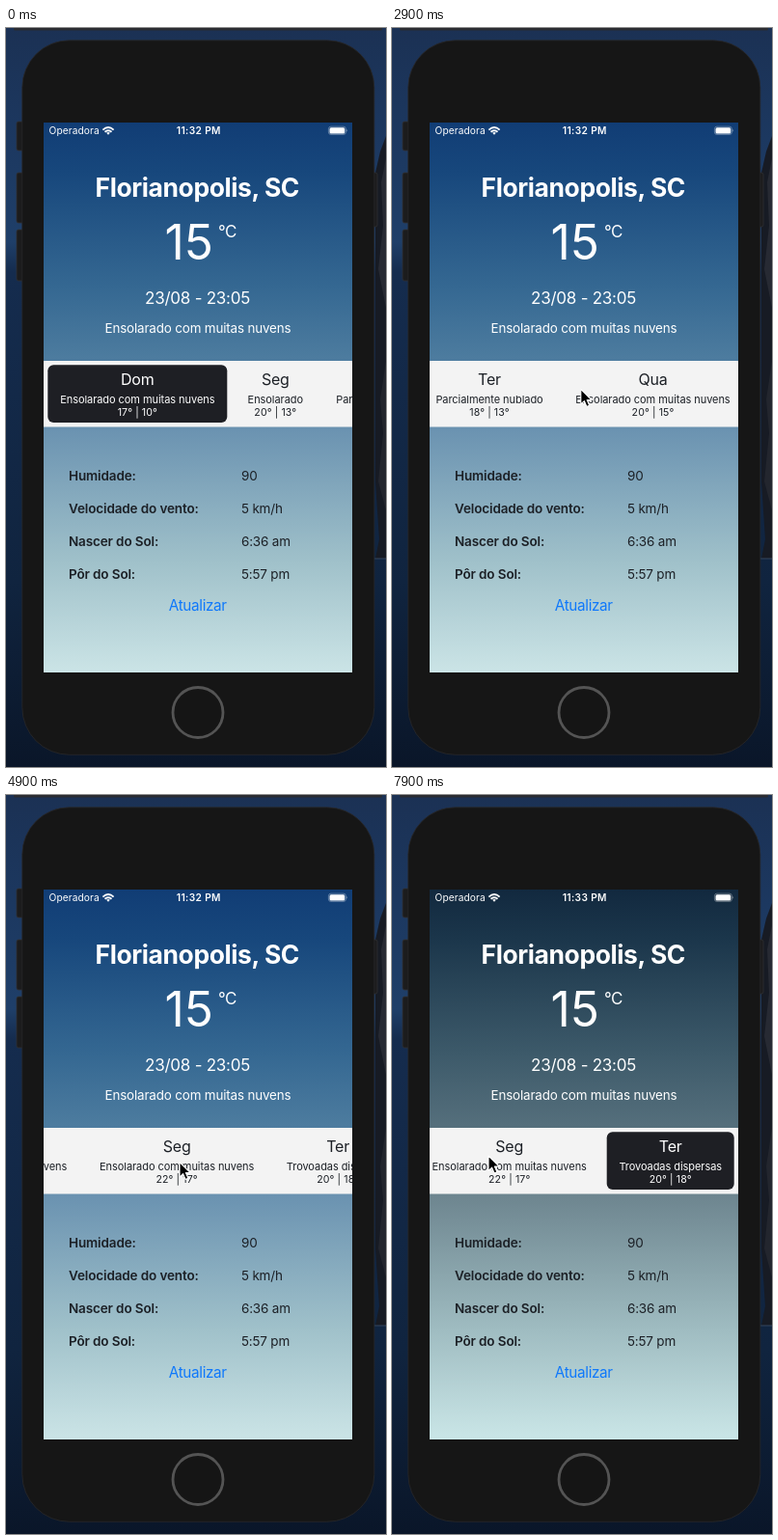
Recreate the animation shown at these times as an HTML page. Size 394 by 766 pixels, loop 8000 ms.

```html
<!DOCTYPE html>
<html lang="pt">
<head>
<meta charset="utf-8">
<title>Previsão do tempo</title>
<style>
html, body { margin: 0; width: 100%; height: 100%; overflow: hidden; background: #0d1c34; }
svg { display: block; width: 394px; height: 766px; }
text { font-family: Inter, Roboto, sans-serif; white-space: pre; }
</style>
</head>
<body>
<svg id="stage" viewBox="0 0 394 766" xmlns="http://www.w3.org/2000/svg">
  <defs>
    <linearGradient id="wall" x2="0" y2="1">
      <stop offset="0" stop-color="#1b3154"/>
      <stop offset=".15" stop-color="#1c3860"/>
      <stop offset=".29" stop-color="#1f3f69"/>
      <stop offset=".33" stop-color="#152c4e"/>
      <stop offset=".75" stop-color="#10243f"/>
      <stop offset="1" stop-color="#0a1629"/>
    </linearGradient>
    <linearGradient id="day" x2="0" y2="1">
      <stop offset="0" stop-color="#113d75"/>
      <stop offset=".09" stop-color="#17477c"/>
      <stop offset=".3" stop-color="#356892"/>
      <stop offset=".43" stop-color="#4d7c9f"/>
      <stop offset=".56" stop-color="#6b93b1"/>
      <stop offset=".8" stop-color="#a0c1ca"/>
      <stop offset="1" stop-color="#cbe4e6"/>
    </linearGradient>
    <linearGradient id="storm" x2="0" y2="1">
      <stop offset="0" stop-color="#12293f"/>
      <stop offset=".09" stop-color="#1b364b"/>
      <stop offset=".3" stop-color="#3d5a6a"/>
      <stop offset=".43" stop-color="#556f7c"/>
      <stop offset=".56" stop-color="#6e8690"/>
      <stop offset=".8" stop-color="#9fbcc1"/>
      <stop offset="1" stop-color="#cae6e7"/>
    </linearGradient>
    <clipPath id="strip"><rect x="39" y="345" width="320" height="68.5"/></clipPath>
  </defs>

  <rect width="394" height="766" fill="url(#wall)"/>
  <path d="M394 112L388 128 383 150V470L387 530 383 550H394Z" fill="#171b24"/>
  <path d="M394 135L389 160 391 205 386 250 394 290Z" fill="#272a33"/>
  <path d="M394 345L388 385 391 420 386 470 394 500Z" fill="#23262e"/>
  <path d="M382 550H394" stroke="#34465f"/>
  <rect x="8" width="382" height="2.5" rx="1" fill="#2b2c31"/>

  <g fill="#1c1c1d" stroke="#303033" stroke-width=".8">
    <rect x="11" y="97" width="9" height="30" rx="2"/>
    <rect x="11" y="150" width="9" height="52" rx="2"/>
    <rect x="11" y="209" width="9" height="53" rx="2"/>
    <rect x="377" y="150" width="8" height="56" rx="2"/>
    <rect x="16.8" y="12.8" width="365" height="740.5" rx="49" fill="#161616" stroke="#29292b"/>
  </g>
  <circle cx="199" cy="709.5" r="26" fill="#151515" stroke="#545454" stroke-width="2.8"/>

  <rect id="sky" x="39" y="98" width="320" height="570"/>
  <g id="labels"></g>

  <g fill="none" stroke="#fff" stroke-width="1.9">
    <path d="M100.4 105.6Q106 100.4 111.6 105.6"/>
    <path d="M102.5 107.8Q106 104.6 109.5 107.8"/>
    <path d="M104.2 108.7Q106 107.3 107.8 108.7L106 110.8Z" fill="#fff" stroke="none"/>
  </g>
  <rect x="334.4" y="102.2" width="18" height="8.2" rx="2.4" fill="none" stroke="#fff" stroke-opacity=".4" stroke-width=".8"/>
  <rect x="335.5" y="103.2" width="15.8" height="6.2" rx="1.5" fill="#fff"/>
  <path d="M353.4 104.8q1.5 1.5 0 3z" fill="#fff" opacity=".5"/>

  <rect x="39" y="345" width="320" height="68.5" fill="#f3f3f3"/>
  <g clip-path="url(#strip)"><g id="cards"></g></g>

  <path id="cursor" d="M0 0V15.6L3.6 12.2 6.1 18 8.9 16.8 6.4 11.1H11.2Z" fill="#000" stroke="#fff" stroke-width="1.1" stroke-linejoin="round"/>
</svg>
<script>
const LOOP = 8000, STEP = 100;
const MINUTE_AT = 5000, SELECT_AT = 7100;
const INK = '#1c2026', WHITE = '#fff', CARD = '#1e1f24';
const $ = id => document.getElementById(id);

function add(parent, tag, attrs, content) {
  const el = document.createElementNS('http://www.w3.org/2000/svg', tag);
  for (const key in attrs) el.setAttribute(key, attrs[key]);
  if (content) el.textContent = content;
  parent.append(el);
  return el;
}

function write(parent, content, x, y, size, spacing, fill, anchor = 'middle', weight = 400) {
  return add(parent, 'text', {
    x, y, fill, 'font-size': size, 'letter-spacing': spacing,
    'text-anchor': anchor, 'font-weight': weight
  }, content);
}

const labels = $('labels');
write(labels, 'Operadora', 44.5, 110.3, 10.2, 0.1, WHITE, 'start');
const clock = write(labels, '11:32 PM', 199.8, 110.3, 10.2, 0.35, WHITE, 'middle', 600);
write(labels, 'Florianopolis, SC', 198.3, 175, 26.5, -0.42, WHITE, 'middle', 700);
write(labels, '15', 190, 240, 50, 0.6, WHITE);
write(labels, '°C', 229.5, 217, 17, -0.4, WHITE);
write(labels, '23/08 - 23:05', 198.6, 286, 17, -0.25, WHITE);
write(labels, 'Ensolarado com muitas nuvens', 199, 316, 13.4, -0.15, WHITE);
[
  ['Humidade:', '90'],
  ['Velocidade do vento:', '5 km/h'],
  ['Nascer do Sol:', '6:36 am'],
  ['Pôr do Sol:', '5:57 pm']
].forEach(([name, value], i) => {
  const y = 469.3 + i * 33.8;
  write(labels, name, 65, y, 13.5, -0.13, INK, 'start', 600);
  write(labels, value, 244, y, 13.5, -0.2, INK, 'start');
});
write(labels, 'Atualizar', 198.8, 604.3, 15.3, -0.35, '#0f78fb');

// day, description, temperatures, card width
const SUNNY = 'Ensolarado com muitas nuvens', PARTLY = 'Parcialmente nublado';
let left = 43.3;
const cards = [
  ['Dom', SUNNY, '17° | 10°', 186],
  ['Seg', 'Ensolarado', '20° | 13°', 84],
  ['Ter', PARTLY, '18° | 13°', 137],
  ['Qua', SUNNY, '20° | 15°', 186],
  ['Qui', PARTLY, '21° | 15°', 137],
  ['Sex', 'Pouco nublado', '22° | 17°', 107],
  ['Sáb', PARTLY, '22° | 17°', 137],
  ['Dom', SUNNY, '23° | 17°', 186],
  ['Seg', SUNNY, '22° | 17°', 186],
  ['Ter', 'Trovoadas dispersas', '20° | 18°', 132]
].map(([day, sky, temps, width]) => {
  const g = add($('cards'), 'g', {});
  const box = add(g, 'rect', { x: left, y: 349.2, width, height: 59.8, rx: 6 });
  const mid = left + width / 2;
  const lines = [
    write(g, day, mid, 370.3, 16, -0.2),
    write(g, sky, mid, 388.5, 11, -0.06),
    write(g, temps, mid, 402.2, 10.6, 0.1)
  ];
  left += width + 8;
  return { box, lines };
});

function select(index) {
  cards.forEach(({ box, lines }, i) => {
    box.setAttribute('fill', i === index ? CARD : 'none');
    lines.forEach(line => line.setAttribute('fill', i === index ? WHITE : INK));
  });
}

// time, scroll offset; "out" slows towards the end of the step
const SCROLL = [
  [0, 0], [2000, 0], [2200, 86], [2350, 165], [3000, 300, 'out'], [3350, 312],
  [3600, 422], [4100, 690, 'out'], [4300, 820.5], [4500, 935],
  [5200, 1239, 'out'], [5350, 1246, 'out'], [5600, 1241.6], [5800, 1238.6, 'out'], [LOOP, 1238.6]
];
// time, x, y
const POINTER = [
  [1800, 322, 790], [1900, 316, 640], [2000, 304, 388], [2200, 218, 384], [2350, 139, 383],
  [2800, 180, 376], [3300, 259, 368], [3600, 150, 365], [3750, 90, 366], [4100, 300, 374],
  [4300, 215, 374], [4500, 100, 376], [4800, 190, 380], [5200, 150, 382], [5600, 119, 383],
  [6200, 190, 388], [6700, 281, 392], [7200, 281, 392], [7700, 100, 374], [LOOP, 100, 374]
];

function at(track, t, column) {
  if (t <= track[0][0]) return track[0][column];
  const i = track.findIndex(key => key[0] >= t);
  const a = track[i - 1], b = track[i];
  let p = (t - a[0]) / (b[0] - a[0]);
  if (b.includes('out')) p = 1 - (1 - p) ** 2;
  return a[column] + (b[column] - a[column]) * p;
}

let selected = -1;
function draw(t) {
  const stormy = t >= SELECT_AT;
  const index = stormy ? 9 : 0;
  if (index !== selected) select(selected = index);
  $('sky').setAttribute('fill', stormy ? 'url(#storm)' : 'url(#day)');
  clock.textContent = t < MINUTE_AT ? '11:32 PM' : '11:33 PM';
  $('cards').setAttribute('transform', `translate(${-at(SCROLL, t, 1)} 0)`);
  $('cursor').setAttribute('transform', `translate(${at(POINTER, t, 1)} ${at(POINTER, t, 2)})`);
}

const start = performance.now();
function tick() {
  const t = (performance.now() - start) % LOOP;
  draw(Math.floor(t / STEP) * STEP);
  requestAnimationFrame(tick);
}
draw(0);
requestAnimationFrame(tick);
</script>
</body>
</html>
```
